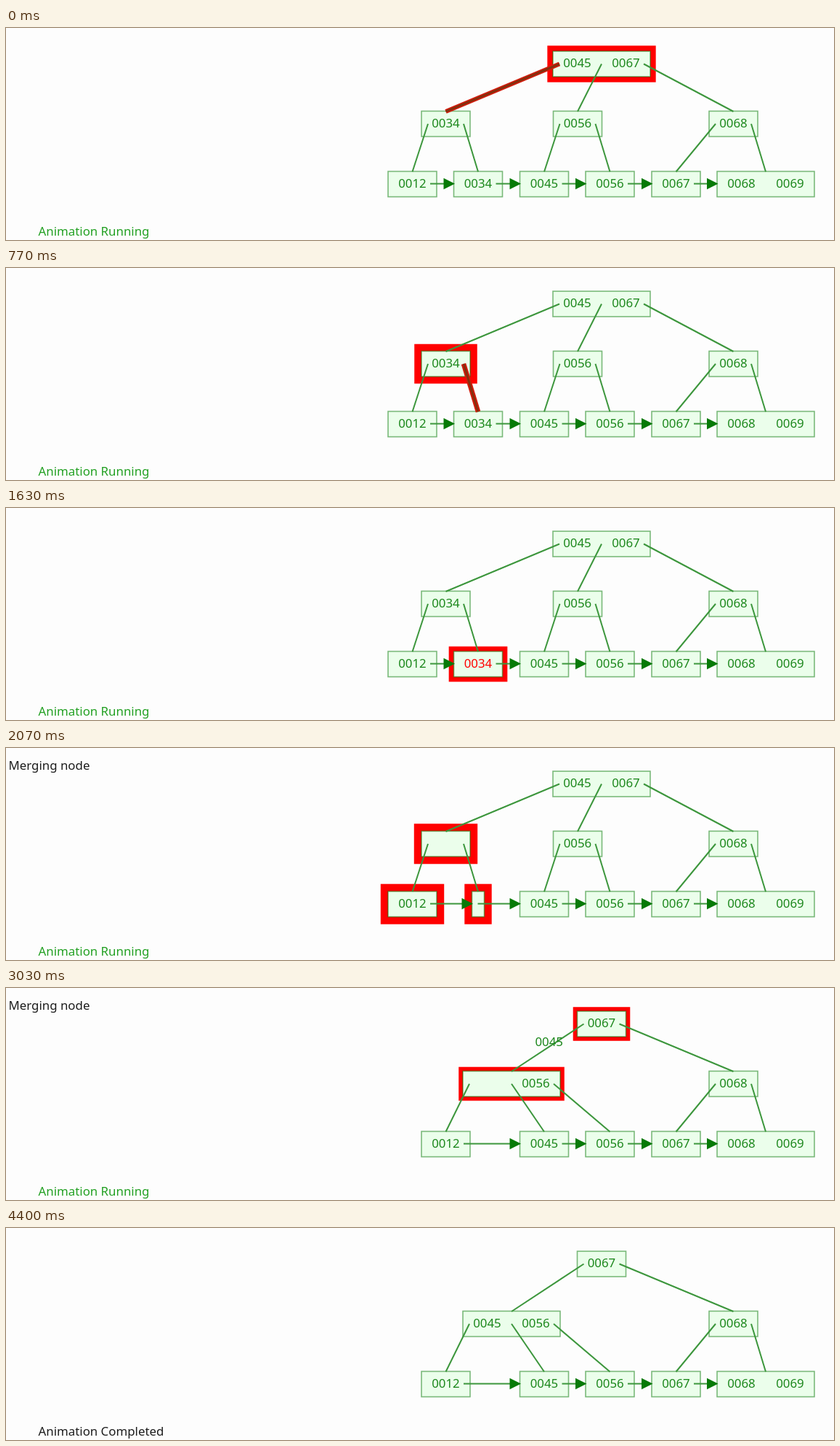
An HTML page that plays this animation: 1140 by 292 pixels, repeating every 4430 ms.

```html
<!DOCTYPE html>
<html lang="en">
<head>
<meta charset="utf-8">
<title>Tree deletion</title>
<style>
  html, body { margin: 0; width: 100%; height: 100%; overflow: hidden; background: #fdfdfd; }
  svg { display: block; width: 1140px; height: 292px; }
  text { font: 16.85px "Noto Sans", "Open Sans", sans-serif; fill: #1c871c; }
  .key { text-anchor: middle; }
  .key.marked { fill: #f00; }
  .box { fill: #ebfeeb; stroke: rgba(0, 119, 0, 0.5); stroke-width: 1.6; }
  .glow { fill: none; stroke: #f00; stroke-width: var(--glow); }
  .edge { stroke: #3c963c; stroke-width: 2; }
  .hot { stroke: #d01c0c; stroke-width: var(--wire); }
  .core { stroke: #82300e; stroke-width: 2.6; }
  .head { fill: #087a08; }
  .dark { fill: #1c1c1c; }
  .running { fill: #22a022; }
</style>
</head>
<body>
<svg id="stage" viewBox="0 0 1140 292"></svg>
<script>
const LOOP = 4430, FIRST = 285, STEP = 435, PULSE = 1740;
const CELL = 67, EMPTY = 17, HEIGHT = 35, PORT = 9;
const ROW_TOP = [32, 114.5, 197.5];
const stage = document.getElementById('stage');

const node = (x, row, keys, kids = []) => ({ x, row, keys, kids });

// Tree before, between and after the two merges
const full = {
  root: node(820, 0, ['0045', '0067'], ['left', 'mid', 'right']),
  left: node(605.5, 1, ['0034'], ['l12', 'l34']),
  mid: node(787, 1, ['0056'], ['l45', 'l56']),
  right: node(1001.5, 1, ['0068'], ['l67', 'l68']),
  l12: node(559.5, 2, ['0012']),
  l34: node(650, 2, ['0034']),
  l45: node(741, 2, ['0045']),
  l56: node(831.5, 2, ['0056']),
  l67: node(922.5, 2, ['0067']),
  l68: node(1046, 2, ['0068', '0069'])
};
const emptied = {
  ...full,
  left: node(605.5, 1, [''], ['l12', 'l34']),
  l34: node(650, 2, [])
};
const { l34, ...rest } = full;
const joined = {
  ...rest,
  left: node(605.5, 1, [], ['l12']),
  l12: node(605.5, 2, ['0012'])
};
const { mid, ...noMid } = joined;
const merged = key => ({
  ...noMid,
  root: node(820, 0, ['0067'], ['left', 'right']),
  left: node(696, 1, [key, '0056'], ['l12', 'l45', 'l56'])
});

const steps = [
  { tree: full, glow: ['root'], wire: 'left' },
  { tree: full, glow: ['left'] },
  { tree: full, glow: ['left'], wire: 'l34' },
  { tree: full, glow: ['l34'] },
  { tree: full, glow: ['l34'], marked: 'l34' },
  { tree: emptied, glow: ['left', 'l12', 'l34'], note: true },
  { tree: joined, glow: ['root', 'left', 'mid'], note: true },
  { tree: merged(''), glow: ['root', 'left'], note: true, label: true },
  { tree: merged('0045'), glow: [], done: true }
];
const labelStep = steps.findIndex(s => s.label);

const widthOf = n => n.keys.length * CELL || EMPTY;
const leftOf = n => n.x - widthOf(n) / 2;
const rightOf = n => n.x + widthOf(n) / 2;

function portX(n, i) {
  if (i === 0) return leftOf(n) + PORT;
  return i === n.keys.length ? rightOf(n) - PORT : leftOf(n) + i * CELL;
}

const line = (cls, x1, y1, x2, y2) =>
  `<line class="${cls}" x1="${x1}" y1="${y1}" x2="${x2}" y2="${y2}"/>`;
const text = (cls, x, y, str) => `<text class="${cls}" x="${x}" y="${y}">${str}</text>`;

function box(n, glowing) {
  const rect = cls => `<rect class="${cls}" x="${leftOf(n)}" y="${ROW_TOP[n.row]}" ` +
    `width="${widthOf(n)}" height="${HEIGHT}"/>`;
  return (glowing ? rect('glow') : '') + rect('box');
}

function edges(tree, n, wire) {
  return n.kids.map((id, i) => {
    const kid = tree[id];
    const ends = [portX(n, i), ROW_TOP[n.row] + 17.5, kid.x, ROW_TOP[kid.row] + 0.5];
    return id === wire ? line('hot', ...ends) + line('core', ...ends) : line('edge', ...ends);
  }).join('');
}

function arrow(from, to) {
  const y = ROW_TOP[2] + 17, tip = leftOf(to) + 1.5;
  return line('edge', rightOf(from) - PORT, y, tip - 12, y) +
    `<path class="head" d="M${tip} ${y}l-15.5 -7.8v15.6z"/>`;
}

const labels = (n, marked) => n.keys.map((key, i) =>
  text(marked ? 'key marked' : 'key', leftOf(n) + (i + 0.5) * CELL, ROW_TOP[n.row] + 22, key)).join('');

function scene({ tree, glow, wire, marked, note, label, done }) {
  const ids = Object.keys(tree);
  const nodes = ids.map(id => tree[id]);
  const leaves = nodes.filter(n => n.row === 2).sort((a, b) => a.x - b.x);
  return '<g display="none">' +
    ids.map(id => box(tree[id], glow.includes(id))).join('') +
    nodes.map(n => edges(tree, n, wire)).join('') +
    leaves.slice(1).map((leaf, i) => arrow(leaves[i], leaf)).join('') +
    ids.map(id => labels(tree[id], id === marked)).join('') +
    (note ? text('dark', 3.5, 30, 'Merging node') : '') +
    (label ? '<text class="key" id="mover">0045</text>' : '') +
    (done ? text('dark', 44.5, 285.5, 'Animation Completed')
          : text('running', 44.5, 285.5, 'Animation Running')) +
    '</g>';
}

stage.innerHTML = steps.map(scene).join('');
const scenes = [...stage.children];
const mover = document.getElementById('mover');
let shown = -1;

function draw() {
  const t = performance.now() % LOOP;
  const at = Math.max(0, (t - FIRST) / STEP + 1);
  const now = t < FIRST ? 0 : Math.min(steps.length - 1, Math.floor(at));
  if (now !== shown) {
    scenes.forEach((g, i) => g.setAttribute('display', i === now ? 'inline' : 'none'));
    shown = now;
  }

  // Triangle wave shared by every highlight
  const wave = 1 - Math.abs(2 * ((0.2 + t / PULSE) % 1) - 1);
  stage.style.setProperty('--glow', 2 * (5 + 6.67 * wave) + 'px');
  stage.style.setProperty('--wire', 5 + 2.4 * wave + 'px');

  const p = Math.min(1, Math.max(0, at - labelStep));
  mover.setAttribute('x', 786.5 + (662.5 - 786.5) * p);
  mover.setAttribute('y', 54 + (136.5 - 54) * p);
  requestAnimationFrame(draw);
}
draw();
</script>
</body>
</html>
```
